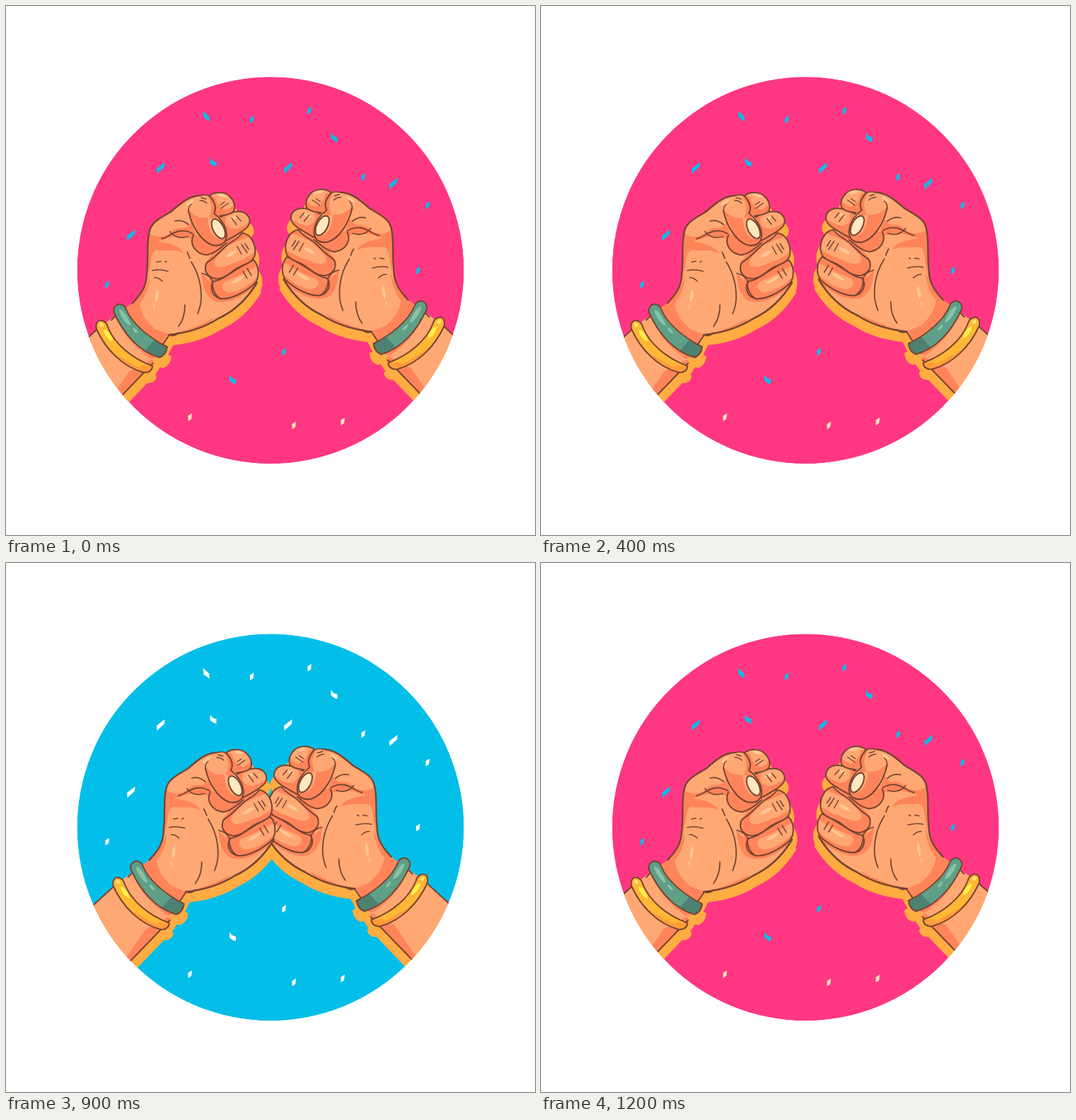
Write an HTML page with a canvas that moves like this. It is 748 px wide and 748 px high and loops after 1300 ms.

```html
<!DOCTYPE html>
<html lang="en">
<head>
<meta charset="utf-8">
<title>Fist bump</title>
<style>
html, body { margin: 0; width: 100%; height: 100%; overflow: hidden; background: #fff; }
canvas { display: block; width: 748px; height: 748px; }
</style>
</head>
<body>
<canvas id="stage" width="748" height="748"></canvas>
<script>
const ctx = document.getElementById('stage').getContext('2d');
const LOOP = 1300, STEP = 100, SHIFT = 23.8;
const PINK = '#ff3782', BLUE = '#02bee8', CREAM = '#ffe8bf';
const SKIN = '#ffa873', DARK = '#ff8459', LIGHT = '#ffc796', LINE = '#784331', GLOW = '#ffac42';
const P = d => new Path2D(d);

// Outlines of the left hand; the right one is mirrored.
const side = 'M179 420C190 408 199 397 199 379C202 355 198 336 203 318C206 305 220 299 233 291C246 280 258 268 276 268C282 267 285 268 288 269';
const heel = 'M355 391C343 411 326 430 300 442C280 455 258 462 230 465';
const shape = {
  arm: P('M60 520L129 457L155 437L179 420L230 466L222 482L206 506L120 596Z'),
  palm: P(side + 'L335 324L355 391C343 411 326 430 300 442C280 455 258 462 230 465L219 478Z'),
  pinky: P('M350 359C358 367 359 383 352 392C338 405 318 415 304 414C291 411 287 397 294 389C308 388 322 372 350 359Z'),
  ring: P('M288 360C300 352 308 340 320 333C326 330 330 326 334 321C346 322 354 337 352 351C351 360 342 364 332 368C320 373 314 383 303 385C291 388 281 379 282 370C282 365 284 362 288 360Z'),
  middle: P('M302 299C312 294 323 289 333 291C343 293 347 303 343 310C338 318 325 324 311 332L300 310Z'),
  index: P('M287 269C295 262 310 262 317 270C324 277 325 287 321 291C315 297 306 295 298 298C294 290 294 280 287 269Z'),
  thumb: P('M258 290C259 277 270 267 283 268C291 270 296 280 296 291C303 298 312 310 312 325C311 337 302 340 292 338C276 333 263 312 258 290Z'),
  green: P('M153 434C150 427 157 420 163 422C167 423 169 426 170 429C178 449 202 469 228 482C227 489 223 495 217 497C188 489 166 463 153 434Z'),
  gold: P('M128 457C126 449 130 443 136 445C140 446 143 450 144 454C153 477 177 498 207 509C207 515 202 519 194 518C165 510 141 486 128 457Z')
};
const sideLine = P(side), heelLine = P(heel);
const glowOrder = Object.values(shape);

function fill(path, color) {
  ctx.fillStyle = color;
  ctx.fill(path);
}

function stroke(path, width = 2, color = LINE) {
  ctx.strokeStyle = color;
  ctx.lineWidth = width;
  ctx.stroke(path);
}

// Fills a shape, then paints [color, path] patches inside it.
function part(path, base, patches, outline = true) {
  fill(path, base);
  ctx.save();
  ctx.clip(path);
  for (const [color, d] of patches) fill(P(d), color);
  ctx.restore();
  if (outline) stroke(path);
}

function glow() {
  ctx.save();
  ctx.translate(4.8, 14);
  for (const path of glowOrder) {
    fill(path, GLOW);
    stroke(path, 2, GLOW);
  }
  ctx.restore();
}

function hand() {
  part(shape.arm, SKIN, [
    [DARK, 'M120 596L174 517L206 500L222 512Z'],
    [DARK, 'M179 420L155 437C164 462 180 482 205 499L222 494L240 466Z']
  ], false);
  stroke(P('M60 520L129 457M149 444L156 437M120 596L208 505M222 478L231 465'), 2);
  fill(P('M157 448C167 467 179 481 196 492L187 492C174 484 161 468 153 451Z'), SKIN);

  part(shape.palm, SKIN, [
    [DARK, 'M179 420C196 405 201 390 203 380C204 396 198 409 189 421C190 433 198 446 211 457L232 465L216 480Z'],
    [DARK, 'M201 319C202 325 201 345 201 384C206 362 204 347 213 345C226 347 239 343 251 350C247 339 230 335 214 333C226 330 236 325 249 326L271 331L262 305C256 320 241 309 235 319C222 329 208 328 201 319Z'],
    [DARK, 'M258 325L271 339L292 350L281 365L288 390L277 378C278 398 282 412 297 418C318 421 338 410 357 392L350 330L300 320Z'],
    [DARK, 'M232 465C260 458 276 450 296 440C281 456 258 465 232 468Z']
  ], false);
  stroke(sideLine, 2.4);
  stroke(heelLine, 2.5);

  part(shape.pinky, SKIN, [
    [DARK, 'M285 415L290 386L317 377L352 354L356 367C341 375 326 384 309 390C302 397 308 405 317 405C332 403 345 394 357 382L360 400L320 422Z'],
    [LIGHT, 'M318 392C324 386 332 382 337 381C333 388 325 393 318 392Z']
  ]);

  const fold = P('M265 324C259 336 267 350 283 352C292 351 300 345 312 335');
  fill(fold, DARK);
  stroke(fold);

  part(shape.ring, SKIN, [
    [DARK, 'M278 385L281 362L308 340L312 342C301 351 291 360 296 367C305 374 321 362 335 359L356 346L354 366L310 390Z'],
    [DARK, 'M312 336L334 320L346 325C334 330 324 333 312 340Z'],
    [LIGHT, 'M310 355C315 348 322 345 327 346C323 352 316 356 310 355Z']
  ]);
  part(shape.middle, SKIN, [
    [DARK, 'M300 298L312 297C307 306 313 315 324 315C332 314 339 309 346 304L344 321L311 334Z'],
    [LIGHT, 'M316 303C317 298 324 296 327 297C325 302 320 305 316 303Z']
  ]);
  part(shape.index, SKIN, [
    [DARK, 'M287 267L296 270C297 280 304 286 310 288C316 288 320 283 324 278L323 297L296 299Z'],
    [LIGHT, 'M298 267C304 264 310 266 313 270C308 271 302 270 298 267Z']
  ]);

  fill(shape.thumb, SKIN);
  ctx.save();
  ctx.clip(shape.thumb);
  fill(P('M257 287C267 298 275 301 285 299C286 316 293 330 305 330L313 325L314 344L282 343Z'), DARK);
  fill(P('M284 270C292 278 292 288 287 299L298 303L300 280Z'), DARK);
  ctx.restore();
  stroke(P('M288 269C295 277 298 286 294 293C301 298 312 310 312 325C311 337 302 340 292 338C276 333 263 312 258 290'), 2.1);
  stroke(P('M258 290C258 286 259 283 262 280'), 1.5);
  ctx.save();
  ctx.translate(300.3, 315);
  ctx.rotate(-0.48);
  const nail = new Path2D();
  nail.ellipse(0, 0, 7.6, 15, 0, 0, Math.PI * 2);
  fill(nail, CREAM);
  stroke(nail, 2);
  ctx.restore();

  // Creases and folds.
  stroke(P('M220 329C230 327 236 319 247 318C254 317 259 319 264 322M232 319C239 328 247 329 257 326M239 304C247 302 253 305 258 309'), 1.8);
  stroke(P('M262 362C274 381 276 398 276 411C276 421 274 428 271 435M256 348C258 351 259 354 260 357M253 423C253 435 250 445 244 453M277 378C285 380 290 384 292 389C291 400 296 410 304 414'), 1.8);
  stroke(P('M213 362L219 361M207 374C215 372 222 373 229 375M210 384C214 384 218 386 221 389M225 362L227 361'), 1.6);
  stroke(P('M274 275C278 275 281 276 284 279M276 271L283 273M303 281L309 277M304 286L314 279M319 300L326 309M326 297L332 304M327 340L333 351M333 337L341 349M338 336L343 344M335 375L341 385M341 371L347 381'), 1.5);
  stroke(P('M231 465C236 467 241 465 244 462'), 2);
  fill(P('M214 400C217 404 216 413 212 419C209 415 211 406 214 400ZM211 422L210 430L208 424ZM254 282C257 277 262 274 266 273C264 279 259 283 254 282Z'), LIGHT);

  part(shape.gold, '#ffb735', [
    ['#ff9b3c', 'M130 463C144 490 168 505 207 510L202 522L165 510Z'],
    ['#ffb735', 'M151 477C163 491 178 500 194 506L189 511C172 504 157 492 147 478Z'],
    ['#fff04a', 'M138 458C143 456 150 467 151 474C146 474 139 466 138 458Z'],
    ['#ffe27a', 'M132 449C135 447 138 449 138 453L133 454Z']
  ]);
  part(shape.green, '#5f9f87', [
    ['#4d8171', 'M210 472L230 482L219 500L195 489Z'],
    ['#87c3a5', 'M160 430C164 426 174 443 177 452C171 452 162 440 160 430ZM179 455C182 454 185 458 187 463C183 463 180 460 179 455Z']
  ]);
}

const bits = {
  small: ['M-2.5-2L3-5.5L2 2.5L-2.5 5.5Z', 347.5, 160.5, 429, 148, 505, 242, 596, 282, 582.5, 374, 143, 394, 393, 489, 260, 581.5, 407, 593, 476, 587.5],
  wide: ['M-6 1L5.5-8L5 -1.5L-5.5 8Z', 219, 229, 399, 229, 548, 251, 177, 324],
  lean: ['M-4.5-7.5L4 0L5 7.5L-3.5 1.5Z', 283, 156],
  ribbon: ['M-4.5-6.5C-1-2 2 0 4.5-1L4.5 6C1 6-2 3-4.5 1Z', 464, 186, 293, 221, 320.5, 528.5]
};

function confetti(touching) {
  for (const [d, ...spots] of Object.values(bits)) {
    const path = P(d);
    for (let i = 0; i < spots.length; i += 2) {
      ctx.save();
      ctx.translate(spots[i], spots[i + 1]);
      fill(path, touching ? '#fff' : spots[i + 1] > 560 ? CREAM : BLUE);
      ctx.restore();
    }
  }
}

function left(shift, paint) {
  ctx.save();
  ctx.translate(shift, 0);
  paint();
  ctx.restore();
}

function right(shift, paint) {
  ctx.save();
  ctx.translate(747.5 - shift, -4.5);
  ctx.scale(-1, 1);
  paint();
  ctx.restore();
}

function draw(time) {
  const touching = Math.floor(time % LOOP / STEP) % 2 === 1;
  const shift = touching ? SHIFT : 0;
  ctx.fillStyle = '#fff';
  ctx.fillRect(0, 0, 748, 748);
  const disc = new Path2D();
  disc.arc(374, 373.8, 273.5, 0, Math.PI * 2);
  ctx.save();
  ctx.clip(disc);
  fill(disc, touching ? BLUE : PINK);
  confetti(touching);
  left(shift, glow);
  right(shift, glow);
  right(shift, hand);
  left(shift, hand);
  ctx.restore();
}

ctx.lineCap = ctx.lineJoin = 'round';
const start = performance.now();
function tick() {
  draw(performance.now() - start);
  requestAnimationFrame(tick);
}
tick();
</script>
</body>
</html>
```
